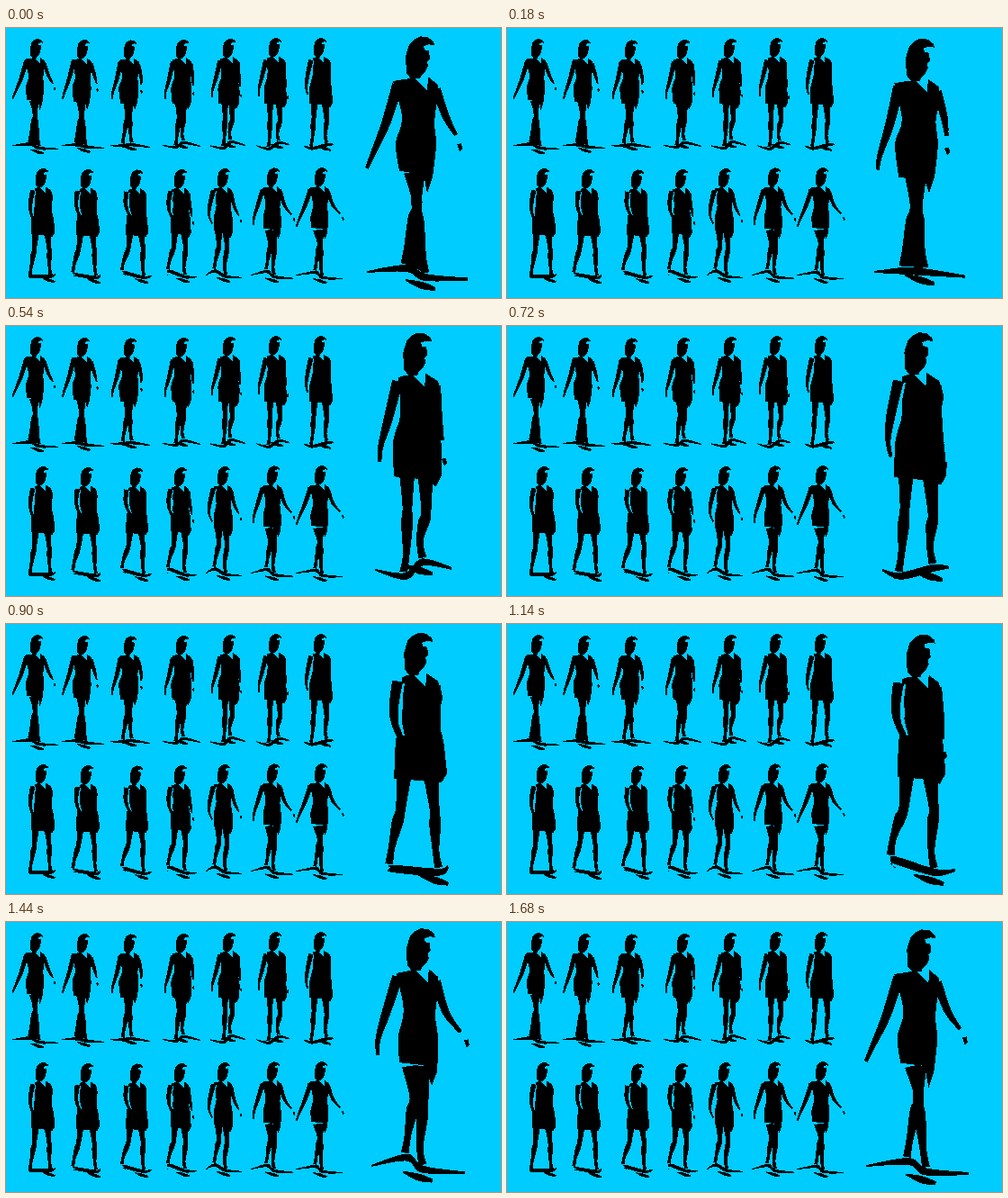
An HTML page that plays this animation: 550 by 300 pixels, repeating every 1740 ms.

```html
<!DOCTYPE html>
<html lang="en">
<head>
<meta charset="utf-8">
<title>Walk cycle</title>
<style>
  html, body { margin: 0; width: 100%; height: 100%; overflow: hidden; background: #00ccff; }
  svg { display: block; width: 100%; height: 100%; shape-rendering: crispEdges; }
</style>
</head>
<body>
<svg viewBox="0 0 550 300">
  <g id="sheet"></g>
  <g id="walker"></g>
</svg>
<script>
const STEPS = 29, STEP_MS = 60, SCALE = 0.453;
const INK = '#000', PAPER = '#00ccff';

const xy = p => p[0].toFixed(1) + ' ' + p[1].toFixed(1);
const add = (p, dx, dy) => [p[0] + dx, p[1] + dy];
const mix = (a, b, u) => [a[0] + (b[0] - a[0]) * u, a[1] + (b[1] - a[1]) * u];
const shape = (d, fill = INK) => `<path d="${d}Z" fill="${fill}"/>`;
const poly = points => shape('M' + points.map(xy).join('L'));

// Smooth line through points, without its opening command.
function curve(points) {
  let d = xy(points[0]);
  for (let i = 0; i < points.length - 1; i++) {
    const a = points[i - 1] || points[i], b = points[i];
    const c = points[i + 1], e = points[i + 2] || c;
    const p = [b[0] + (c[0] - a[0]) / 6, b[1] + (c[1] - a[1]) / 6];
    const q = [c[0] - (e[0] - b[0]) / 6, c[1] - (e[1] - b[1]) / 6];
    d += `C${xy(p)} ${xy(q)} ${xy(c)}`;
  }
  return d;
}

// Tapered limb along points; widths are half widths.
function limb(points, widths, fill) {
  const near = [], far = [];
  points.forEach((p, i) => {
    const a = points[i - 1] || p, b = points[i + 1] || p;
    const len = Math.hypot(b[0] - a[0], b[1] - a[1]) || 1;
    const nx = (b[1] - a[1]) / len * widths[i], ny = (a[0] - b[0]) / len * widths[i];
    near.push(add(p, nx, ny));
    far.unshift(add(p, -nx, -ny));
  });
  return shape('M' + curve(near) + 'L' + curve(far), fill);
}

// Joints of one stride: each coordinate is a mean plus swings of the
// stride (a, b) and of its double, the single footfall (c, d).
function pose(step) {
  const t = step / STEPS * 2 * Math.PI;
  const wave = (mean, a, b = 0, c = 0, d = 0) => mean + a * Math.cos(t) + b * Math.sin(t)
    + c * Math.cos(2 * t) + d * Math.sin(2 * t);
  const bob = wave(0, 0, 0, 0, 2.5);
  const toeL = [wave(437, 8, 3, -2, -5), wave(264, -3, 8, 1, -2)];
  const toeR = [wave(468, -7, -3, 5, 2), wave(267, 1, -6, 4, 1)];
  const hemL = [wave(434, 3, -2), wave(165, -6, 3, 0, 4)];
  const hemR = [wave(482, -8, -1), 166];
  return {
    passing: Math.cos(t - 0.31) > 0.93,
    head: [wave(459, 1, -1.5), 9.3 + bob],
    armL: [
      [435, 63 + bob],
      [wave(426, -4, -1, 0, 3), wave(102, 4, 4)],
      [wave(421, -13, -5, 0, 7), wave(131, 8, 6)],
      [wave(424, -22, -10, -1, 12), wave(149, 7, 5)]
    ],
    armR: [
      [478, 68 + bob],
      [wave(484, 5, -2, 0, -1), wave(102, -3)],
      [wave(490, 10, -6, 0, -6), wave(125, -6)]
    ],
    handR: [wave(493, 11, -8, 0, -8), wave(143, -11, 4)],
    legL: [
      [wave(447, 4), 160],
      [wave(448, 9, 0, 0, -2), wave(199, -5, 1, 0, 2)],
      add(toeL, 3, -19), toeL
    ],
    legR: [
      [wave(464, -7, -1), 160],
      [wave(466, -10, -3), wave(202, -5, 2)],
      add(toeR, -3, -19), toeR
    ],
    sideL: [
      [wave(435, -5, -1), 59 + bob],
      [wave(440, 0, -2), 100 + bob],
      [wave(433, 0, -3), 128], hemL
    ],
    sideR: [
      [480, 63 + bob],
      [wave(482, -3, 1), 82 + bob],
      [wave(478, -2), 104],
      [wave(482, -4), 130], hemR
    ],
    hem: [[464, hemL[1] + 3], [hemR[0] - 6, wave(180, 4)]],
    shadowL: [wave(414, -13, -4, 0, 7), 271],
    shadowR: [wave(502, 11, -3), wave(274, 5, -3)]
  };
}

const leg = ([hip, knee, ankle, toe]) =>
  limb([hip, knee, mix(knee, ankle, 0.35), ankle, toe], [9, 5.5, 6.5, 3.8, 4.5]);

function torso({ head, sideL, sideR, hem }) {
  const neck = [[9, 45], [8, 60], [-5, 47], [-13, 47]].map(p => add(head, ...p));
  return shape('M' + curve(sideL) + 'L' + hem.map(xy).join('L')
    + 'L' + curve([...sideR].reverse()) + 'L' + neck.map(xy).join('L'));
}

// Hair with its fringe, then the profile down to the chin.
function headShape(top) {
  const hair = [[10, 46], [-10, 47], [-15, 41], [-16, 22], [-12, 9], [-6, 3], [0, 0], [9, 1], [15, 6], [16, 10]];
  const face = [[10, 9], [4, 11], [5, 15], [10, 16], [11, 25], [8, 28], [9, 33], [6, 39], [1, 44]];
  hair[0] = [0, 47];
  return poly([...hair, ...face].map(p => add(top, ...p)));
}

function shadow({ shadowL, shadowR, legL, legR }) {
  const toeL = add(legL[3], 2, 5), toeR = add(legR[3], 0, 5);
  return limb([shadowL, toeL, toeR, shadowR], [1, 4, 4, 1.5])
    + limb([add(toeR, -22, 3), add(toeR, -4, 9), add(toeR, 11, 13)], [1, 4, 2]);
}

function figure(step) {
  const p = pose(step), { armL, armR, handR, legL, legR } = p;
  const gap = armL.slice(0, 3).map(q => add(q, 6, 2));
  const inFront = armL[3][0] > 426;
  return shadow(p) + leg(legL) + leg(legR)
    + (p.passing ? poly([...legL.slice(1), ...legR.slice(1).reverse()]) : '')
    + torso(p)
    + (inFront ? limb(gap, [2, 2.5, 1], PAPER) : '')
    + limb(armL, [6, 5, 3, 2])
    + limb(armR, [5, 4, 2])
    + poly([[-3, -3], [2, -4], [3, 2], [0, 5]].map(q => add(handR, ...q)))
    + headShape(p.head);
}

// Contact sheet: every second step of the stride.
const rows = [
  { y: 8, heads: [34, 86, 138, 196, 248, 299, 349] },
  { y: 152, heads: [40, 90, 145, 194, 242, 297, 350] }
];
document.getElementById('sheet').innerHTML = rows.map((row, r) =>
  row.heads.map((x, i) => {
    const step = (r * row.heads.length + i) * 2;
    const shift = x - SCALE * pose(step).head[0];
    return `<g transform="translate(${shift} ${row.y}) scale(${SCALE})">${figure(step)}</g>`;
  }).join('')).join('');

const walker = document.getElementById('walker');
const start = performance.now();
let shown = -1;

function draw(now) {
  const step = Math.floor(Math.max(0, now - start) / STEP_MS) % STEPS;
  if (step !== shown) {
    walker.innerHTML = figure(step);
    shown = step;
  }
  requestAnimationFrame(draw);
}
draw(start);
</script>
</body>
</html>
```
